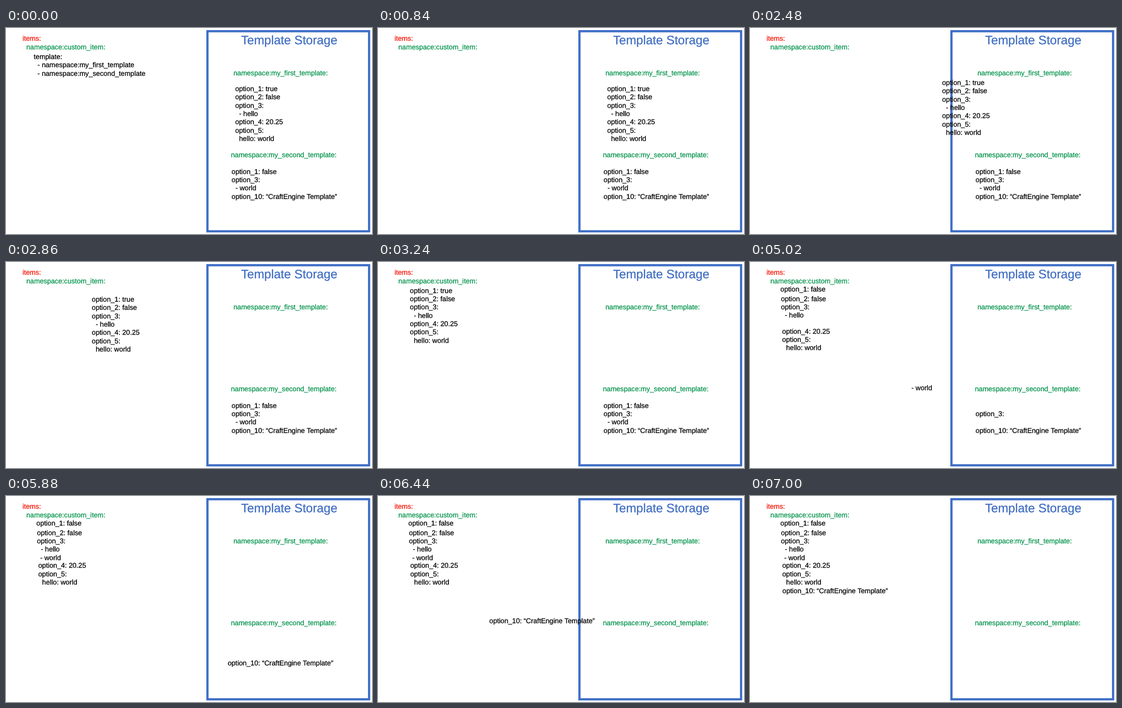
An HTML page for the animation above (7.56 s loop, 720 by 405 pixels).

```html
<!DOCTYPE html>
<html lang="en">
<head>
<meta charset="utf-8">
<title>Template Storage</title>
<style>
  html, body { margin: 0; width: 100%; height: 100%; overflow: hidden; background: #fff; }
  svg { display: block; width: 100%; height: 100%; }
  text {
    font: 13.65px "Liberation Sans", Arial, sans-serif;
    text-rendering: geometricPrecision;
    fill: var(--ink, #000); stroke: var(--ink, #000); stroke-width: 0.28px;
  }
  .title { font-size: 24.2px; --ink: #3e6cc2; }
  .key { --ink: #00924a; }
  .root { --ink: #f51405; }
</style>
</head>
<body>
<svg id="stage" viewBox="0 0 720 405">
  <rect x="396.3" y="6.3" width="318" height="393.4" fill="none" stroke="#3f6ec6" stroke-width="4.4"/>
  <text class="title" x="462.4" y="32.2">Template Storage</text>
  <text class="root" x="32.4" y="25.4">items:</text>
  <text class="key" x="40" y="41.8">namespace:custom_item:</text>
  <text class="key" x="447.5" y="93.3">namespace:my_first_template:</text>
  <text class="key" x="442.5" y="254.2">namespace:my_second_template:</text>
</svg>
<script>
const LOOP = 7560, LINE = 16.35, INDENT = 7.6;
const NS = "http://www.w3.org/2000/svg";
const stage = document.getElementById("stage");

// A leading ">" indents the line one level.
function block(x, y, lines) {
  const g = document.createElementNS(NS, "g");
  lines.forEach((line, i) => {
    const label = line.replace(/^>/, "");
    const t = document.createElementNS(NS, "text");
    t.setAttribute("x", x + (label === line ? 0 : INDENT));
    t.setAttribute("y", y + i * LINE);
    t.textContent = label;
    g.appendChild(t);
  });
  return stage.appendChild(g);
}

const X1 = 450.9, Y1 = 123.9, X2 = 443.8, Y2 = 286.7;
const refs = block(54.5, 61.1, ["template:", ">- namespace:my_first_template", ">- namespace:my_second_template"]);
const oldFirst = block(X1, Y1, ["option_1: true"]);
const middle = block(X1, Y1 + LINE, ["option_2: false", "option_3:", ">- hello"]);
const tail = block(X1, Y1 + 4 * LINE, ["option_4: 20.25", "option_5:", ">hello: world"]);
const newFirst = block(X2, Y2, ["option_1: false"]);
const heading = block(X2, Y2 + LINE, ["option_3:"]);
const world = block(X2, Y2 + 2 * LINE, [">- world"]);
const last = block(X2, Y2 + 3 * LINE, ["option_10: “CraftEngine Template”"]);

const span = (t, start, length) => Math.min(1, Math.max(0, (t - start) / length));
const ease = u => u < 0.5 ? 2 * u * u : 1 - 2 * (1 - u) * (1 - u);
const glide = (t, start, length) => ease(span(t, start, length));
const shift = (g, x, y) => g.setAttribute("transform", `translate(${x.toFixed(2)} ${y.toFixed(2)})`);
const fade = (g, u) => g.setAttribute("opacity", 1 - u);

function draw(t) {
  fade(refs, span(t, 80, 760));

  const a = glide(t, 2120, 1180);
  const room = glide(t, 4520, 590);
  shift(oldFirst, -390 * a, -63.6 * a);
  shift(middle, -390 * a, -63.6 * a);
  shift(tail, -390 * a + 2.6 * room, -63.6 * a + 15.6 * room);

  fade(oldFirst, span(t, 3345, 740));
  const b = glide(t, 3345, 1150);
  shift(newFirst, -384 * b, -229 * b);

  const c = glide(t, 4520, 1200);
  shift(world, -384.2 * c, -193 * c);
  fade(heading, span(t, 5130, 740));

  const d = glide(t, 5756, 1250);
  shift(last, -380 * d, -145 * d);
}

function tick() {
  draw(performance.now() % LOOP);
  requestAnimationFrame(tick);
}
tick();
</script>
</body>
</html>
```
